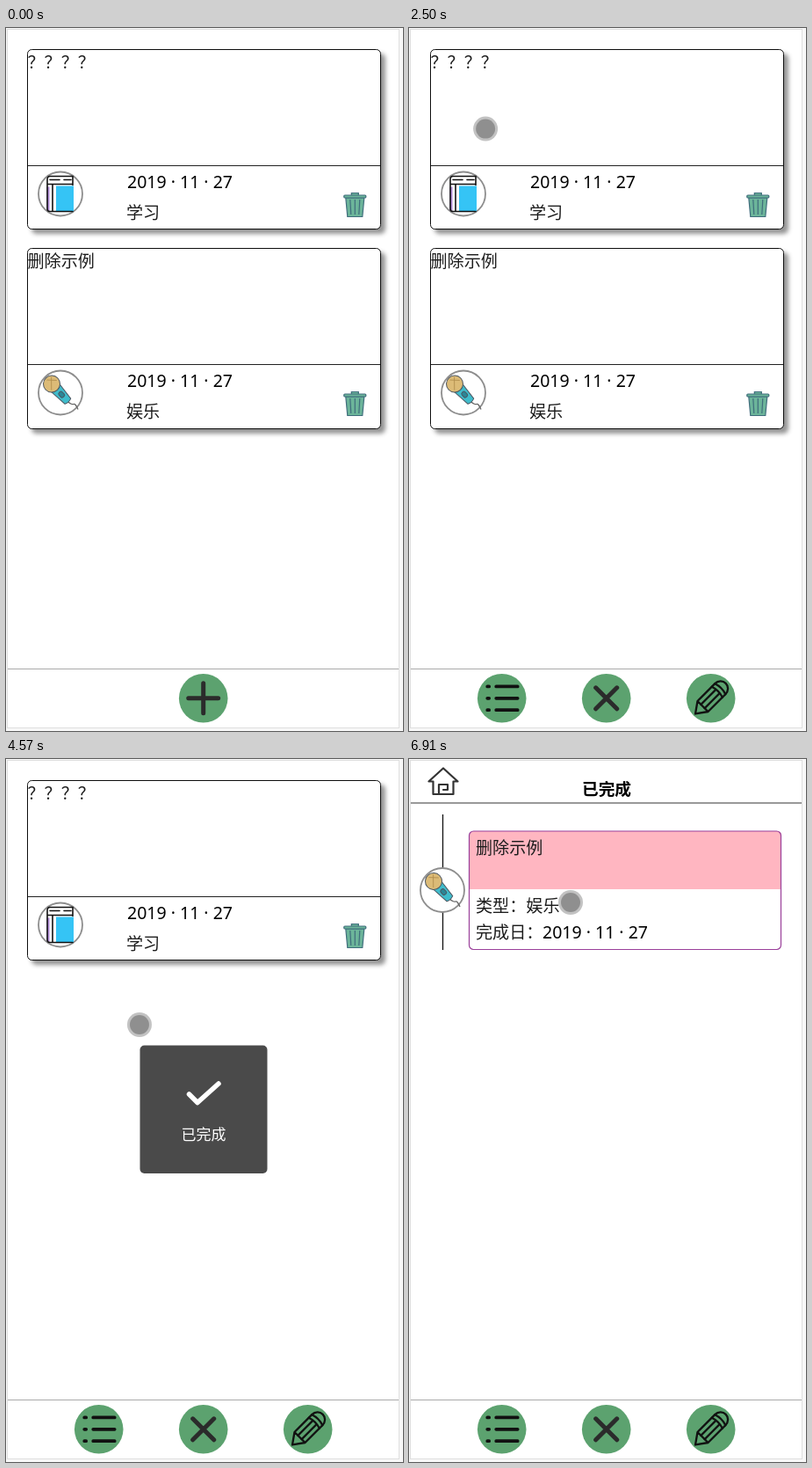
Recreate the animation shown at these times as an HTML page. Size 452 by 799 pixels, loop 7.02 s.

```html
<!DOCTYPE html>
<html lang="zh-CN">
<head>
<meta charset="utf-8">
<style>
  html, body { margin: 0; width: 100%; height: 100%; overflow: hidden; background: #fff; }
  svg { display: block; width: 452px; height: 799px; }
  text { font: 300 19.1px "Noto Sans", "Noto Sans CJK SC", "Noto Sans CJK", sans-serif; fill: #1c1c1c; }
  .date { font-size: 19.5px; font-weight: 400; fill: #000; }
  .title { font-size: 18.7px; font-weight: 700; fill: #000; }
  .small { font-size: 17px; font-weight: 400; text-anchor: middle; }
  .ink { fill: none; stroke: #111; stroke-linecap: round; stroke-linejoin: round; }
</style>
</head>
<body>
<svg id="stage" viewBox="0 0 452 799"></svg>
<script>
const LOOP = 7020;
const DATE = '2019 · 11 · 27';
const BAR = { x: 224.7, y: 761.8, spread: 119 };

const text = (x, y, s, cls = '') => `<text x="${x}" y="${y}" class="${cls}">${s}</text>`;
const at = (x, y, body) => `<g transform="translate(${x} ${y})">${body}</g>`;
const badge = '<circle r="25" fill="#fff" stroke="#8d8d8d" stroke-width="1.8"/>';

const book = badge + `
  <path d="M-14 -8V19" stroke="#b18bd8" stroke-width="3"/>
  <rect x="-5" y="-9" width="20" height="29" fill="#35c4f5"/>
  <path d="M14 -10V-20H-12Q-15 -20 -15 -16V17Q-15 20 -12 20H14M-15 -11H14M-9 -11V19M-12 -16H-1M4 -16H12"
    class="ink" stroke-width="1.6"/>`;

const mic = badge + `
  <path d="M8 10Q13 14 15 13T20 19" fill="none" stroke="#666" stroke-width="1.3"/>
  <g transform="translate(-10 -10) rotate(47)" stroke="#4b5560">
    <path d="M6 -6.5L27 -4.5Q29 0 27 4.5L6 6.5Z" fill="#3fbccb"/>
    <rect x="13" y="-2.5" width="7" height="5" rx="2" fill="#2b8796"/>
    <circle r="9.5" fill="#dcbb77"/>
    <path d="M-6 -5L5 5M-7 1L1 -7" stroke="#b08d4d" stroke-width=".8"/>
  </g>`;

const trash = `<g fill="#6cb59a" stroke="#3f6d7c" stroke-width="1.2">
  <path d="M-10.5 -8H10.5L8.5 13.5H-8.5Z"/>
  ${[-1, 0, 1].map(k => `<path d="M${5.5 * k} -6L${4.5 * k} 11"/>`).join('')}
  <path d="M-4 -11V-13.5H4V-11"/>
  <rect x="-12.5" y="-11" width="25" height="3" rx="1"/></g>`;

const card = (y, height, note, icon, kind) => at(0, y, `
  <rect x="24.5" y=".5" width="402" height="${height}" rx="5" fill="#fff" stroke="#111" filter="url(#shadow)"/>
  <path d="M25 132.5H426" stroke="#222"/>
  ${text(24.5, 21.5, note)}${at(62, 164.5, icon)}
  ${text(138, 158, DATE, 'date')}${text(137, 192.5, kind)}${at(397.3, 177, trash)}`);

const button = (id, icon) => `<g id="${id}"><circle r="27.8" fill="#5ca26f"/>${icon}</g>`;
const listIcon = `<g class="ink" stroke-width="3.7">${[-1, 0, 1].map(k =>
  `<path d="M-16.5 ${13.4 * k}H-14.5M-6.5 ${13.4 * k}H18"/>`).join('')}</g>`;
const pencilIcon = `<g class="ink" stroke-width="2.3" transform="rotate(-45)">
  <path d="M-25 0L-13 -8.5H15A9 8.5 0 0 1 15 8.5H-13ZM-13 -8.5V8.5"/>
  <path d="M-13 -3H10M-13 3H10M10 -8.5Q13 0 10 8.5M15 -8.5Q18 0 15 8.5"/></g>`;
const plusIcon = '<path id="plus" d="M-17 0H17M0 -17V17" class="ink" stroke-width="5" style="stroke:#2b2b2b"/>';

const $ = id => document.getElementById(id);
$('stage').innerHTML = `
  <defs><filter id="shadow" x="-5%" y="-5%" width="112%" height="115%">
    <feDropShadow dx="5" dy="5" stdDeviation="2.5" flood-color="#000" flood-opacity=".42"/>
  </filter></defs>
  <rect width="452" height="799" fill="#f8f8f8"/>
  <rect x="1.5" y="1.5" width="446" height="794" fill="#fff" stroke="#dedede"/>
  <g id="home">
    ${card(24, 204, '？？？？', book, '学习')}
    <g id="second">${card(250, 205, '删除示例', mic, '娱乐')}</g>
  </g>
  <g id="done">
    <path d="M2 50H447" stroke="#777" stroke-width="1.5"/>
    <path class="ink" style="stroke:#333" stroke-width="2.2"
      d="M22.5 25.5L39 10.5L55.5 25.5H50.5V40H27.5V25.5ZM34 40V29H44V35H39"/>
    ${text(197, 41, '已完成', 'title')}
    <g id="empty">${text(235, 62, '暂无已完成', 'small')}</g>
    <g id="entry">
      <path d="M38.5 63V217" stroke="#111" stroke-width="1.3"/>
      ${at(38, 149, mic)}
      <path d="M69 148V87Q69 82 74 82H419Q424 82 424 87V148Z" fill="#ffb6c1"/>
      <rect x="68.5" y="82" width="355" height="134.5" rx="5" fill="none" stroke="#9a3f9a" stroke-width="1.2"/>
      ${text(76, 108, '删除示例')}${text(76, 174, '类型：娱乐')}
      ${text(76, 204, '完成日：')}${text(152, 204, DATE, 'date')}
    </g>
  </g>
  <path d="M2 728.5H447" stroke="#aaa"/>
  ${button('list', listIcon)}${button('edit', pencilIcon)}${button('main', plusIcon)}
  <g id="toast">
    <rect x="152.5" y="325.5" width="145" height="145.5" rx="5" opacity=".71"/>
    <path d="M208.5 381L218 390.5L242 369" class="ink" style="stroke:#fff" stroke-width="5.5"/>
    <g style="--c:#fff"><text x="225" y="432.5" class="small" style="fill:#fff">已完成</text></g>
  </g>
  <g id="cursor"><circle r="14" opacity=".24"/><circle r="11" opacity=".26"/></g>`;

// The pointer visits the controls, with a few turning points in between: [time, x, y]
const plus = [229, 768], list = [108, 765], house = [40, 27], bin = [402, 429];
const stops = [
  [150, 309, 814], [550, ...plus], [1490, ...plus], [1700, ...list], [1760, ...list],
  [2180, ...house], [2300, ...house], [2500, 87, 114], [3090, 135, 703], [3500, 397, 470],
  [3650, ...bin], [4130, ...bin], [4570, 152, 302], [4870, 146, 669], [5280, 72, 61],
  [5640, ...list], [5780, ...list], [6290, 251, 480], [6660, 165, 79], [6910, 184, 163],
];

const clamp = v => Math.min(1, Math.max(0, v));
const ramp = (t, from, to) => clamp((t - from) / (to - from));
const slope = (i, axis) => stops[i] && stops[i + 1]
  ? (stops[i + 1][axis] - stops[i][axis]) / (stops[i + 1][0] - stops[i][0]) : 0;

// Monotone tangent: no overshoot at holds and turning points
function tangent(i, axis) {
  const a = slope(i - 1, axis), b = slope(i, axis);
  return a * b > 0 ? 2 * a * b / (a + b) : 0;
}

function pointer(t, axis) {
  let i = 0;
  while (i < stops.length - 2 && t >= stops[i + 1][0]) i++;
  const a = stops[i], b = stops[i + 1], span = b[0] - a[0];
  const u = ramp(t, a[0], b[0]), v = 1 - u;
  return a[axis] * v * v * (1 + 2 * u) + b[axis] * u * u * (3 - 2 * u)
    + span * u * v * (v * tangent(i, axis) - u * tangent(i + 1, axis));
}

const show = (id, on) => $(id).setAttribute('display', on ? 'inline' : 'none');
const move = (id, x, y) => $(id).setAttribute('transform', `translate(${x} ${y})`);

function render(t) {
  const finished = t >= 5840;
  const onDone = finished || (t >= 1800 && t < 2370);
  show('home', !onDone);
  show('done', onDone);
  show('empty', !finished);
  show('entry', finished);
  show('second', t < 4250);

  const open = 1 - (1 - ramp(t, 760, 1460)) ** 1.6;
  move('list', BAR.x - BAR.spread * open, BAR.y);
  move('edit', BAR.x + BAR.spread * open, BAR.y);
  move('main', BAR.x, BAR.y);
  for (const id of ['list', 'edit']) $(id).setAttribute('opacity', clamp(open * 1.3));
  $('plus').setAttribute('transform', `rotate(${45 * open})`);

  const toast = ramp(t, 4250, 4330) * (1 - ramp(t, 5200, 5340));
  show('toast', toast > 0);
  $('toast').setAttribute('opacity', toast);

  show('cursor', t >= 150);
  move('cursor', pointer(t, 1), pointer(t, 2));
}

const start = performance.now();
function tick() {
  render((performance.now() - start) % LOOP);
  requestAnimationFrame(tick);
}
tick();
</script>
</body>
</html>
```
